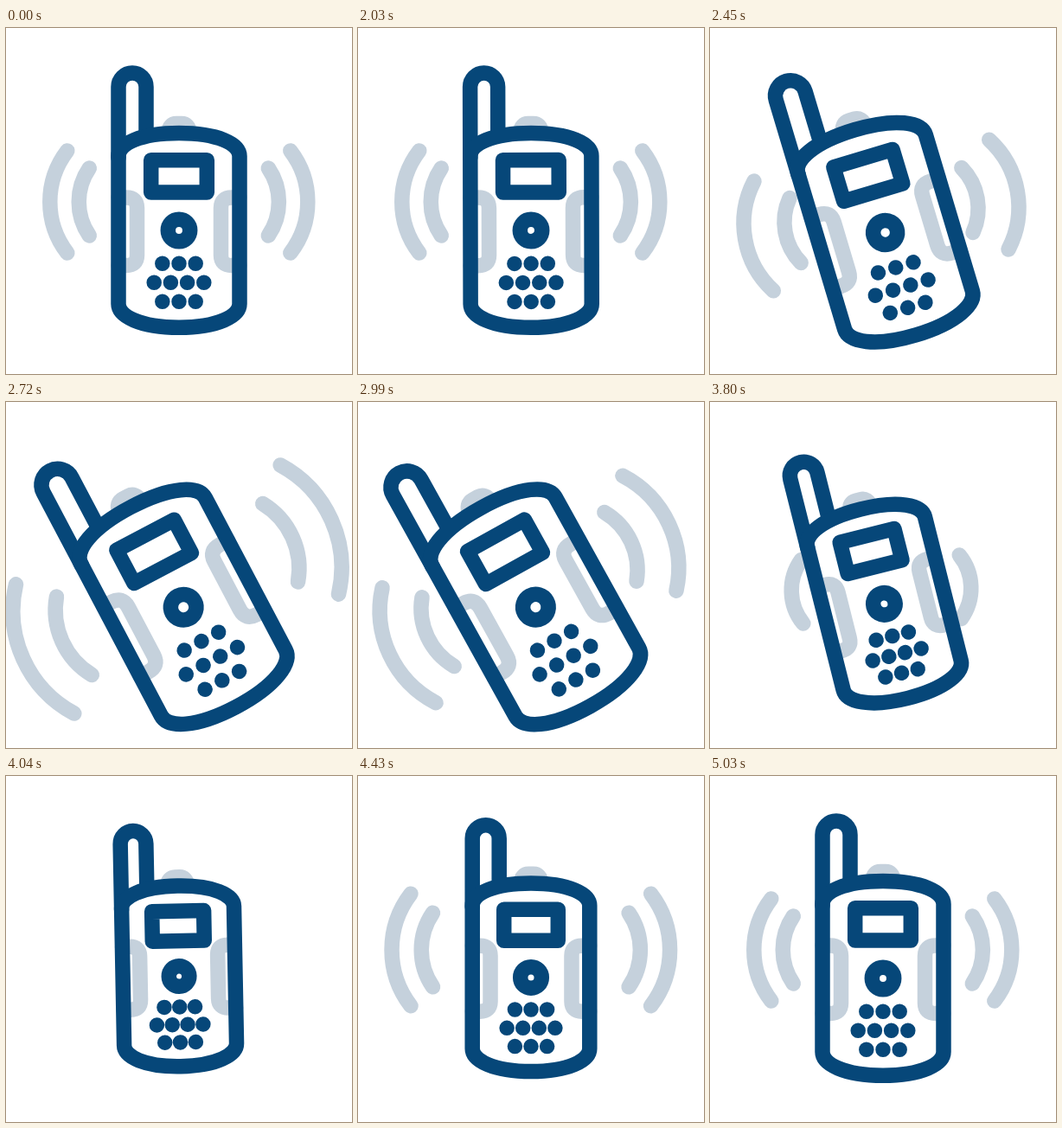
An HTML page that plays this animation: 400x400 px, repeating every 5.06 s.

```html
<!DOCTYPE html>
<html lang="en">
<head>
<meta charset="utf-8">
<title>Walkie-talkie</title>
<style>
  html, body { margin: 0; width: 100%; height: 100%; overflow: hidden; background: #fff; }
  svg { display: block; width: 100%; height: 100%; }
  path, circle, rect {
    fill: none; stroke-width: 17.5; stroke-linecap: round; stroke-linejoin: round;
    vector-effect: non-scaling-stroke;
  }
  .light { stroke: #c5d1dc; }
  .dark { stroke: #064779; }
</style>
</head>
<body>
<svg viewBox="0 0 400 400">
  <g id="waves" class="light"></g>
  <g id="device">
    <g class="light">
      <path d="M188 121C188 114 192 110.5 197 110.5H203C208 110.5 212 114 212 121"/>
      <path id="grip" d="M130 196H139Q151.500 196 151.500 208V262.500Q151.500 274.500 139 274.500H130"/>
      <use href="#grip" transform="matrix(-1 0 0 1 400 0)"/>
    </g>
    <g class="dark">
      <path d="M130 150V68a16 16 0 0 1 32 0V122"/>
      <path d="M130 148C130 134 155 121.500 200 121.500S270 134 270 148V319C270 333 245 346.200 200 346.200S130 333 130 319Z"/>
      <rect x="167.700" y="152.700" width="64.600" height="37.300"/>
      <circle cx="200" cy="234" r="12.700"/>
      <path id="dots"/>
    </g>
  </g>
</svg>
<script>
const LOOP = 5060;
const $ = id => document.getElementById(id);

// Progress from 0 to 1 between two times, with three kinds of easing.
const progress = (t, from, to) => Math.min(1, Math.max(0, (t - from) / (to - from)));
const ease = (...span) => {
  const p = progress(...span);
  return p * p * (3 - 2 * p);
};
const BACK = 2.8;
const backIn = (...span) => {
  const p = progress(...span);
  return p * p * ((BACK + 1) * p - BACK);
};
const backOut = (t, from, to) => 1 - backIn(-t, -to, -from);

const tilt = t => -29 * (ease(t, 2000, 2820) - ease(t, 3475, 4116));
const size = t => 1 + 0.165 * ease(t, 2000, 2780) - 0.237 * ease(t, 3430, 4020) + 0.072 * ease(t, 4020, 4780);
const waveTilt = t => -25 * (ease(t, 2200, 2780) - ease(t, 3440, 3870));

// Waves tuck in behind the case, pop out larger for the call, then pop back to rest.
const CALL = { start: 2340, end: 3810 };
const waveSize = t => 1
  - 0.5 * backIn(t, 2030, CALL.start)
  + 0.743 * backOut(t, CALL.start, 2950)
  - 0.743 * backIn(t, 3510, CALL.end)
  + 0.5 * backOut(t, 4200, 4760);

function addWave(side, reach, half, radius, lag) {
  const el = document.createElementNS("http://www.w3.org/2000/svg", "path");
  el.setAttribute("d", `M0 ${-half}A${radius} ${radius} 0 0 1 0 ${half}`);
  $("waves").append(el);
  return { el, side, reach, lag };
}

const waves = [-1, 1].flatMap(side => [
  addWave(side, 129, 59, 97, 0),
  addWave(side, 103.5, 39, 69, 0.115)
]);

$("dots").setAttribute("d", [3, 4, 3].map((count, row) =>
  Array.from({ length: count }, (_, i) =>
    `M${200 + (i - (count - 1) / 2) * 19.2} ${272.3 + row * 22}h.01`).join("")
).join(""));

function draw(t) {
  $("device").setAttribute("transform",
    `rotate(${tilt(t)} 198 228) translate(200 200) scale(${size(t)}) translate(-200 -200)`);

  const calling = t > CALL.start && t < CALL.end;
  $("waves").setAttribute("transform",
    `translate(${calling ? "198 216.5" : "199.8 201"}) rotate(${waveTilt(t)})`);

  for (const { el, side, reach, lag } of waves) {
    const k = waveSize(t) - (calling ? lag : 0);
    const x = reach + 100 * (k - 1);
    // A wave pulled in behind the case is out of sight.
    el.setAttribute("visibility", x > 85 ? "visible" : "hidden");
    el.setAttribute("transform", `translate(${side * x} 0) scale(${side * k} ${k})`);
  }
}

const start = performance.now();
function frame() {
  draw((performance.now() - start) % LOOP);
  requestAnimationFrame(frame);
}
frame();
</script>
</body>
</html>
```
